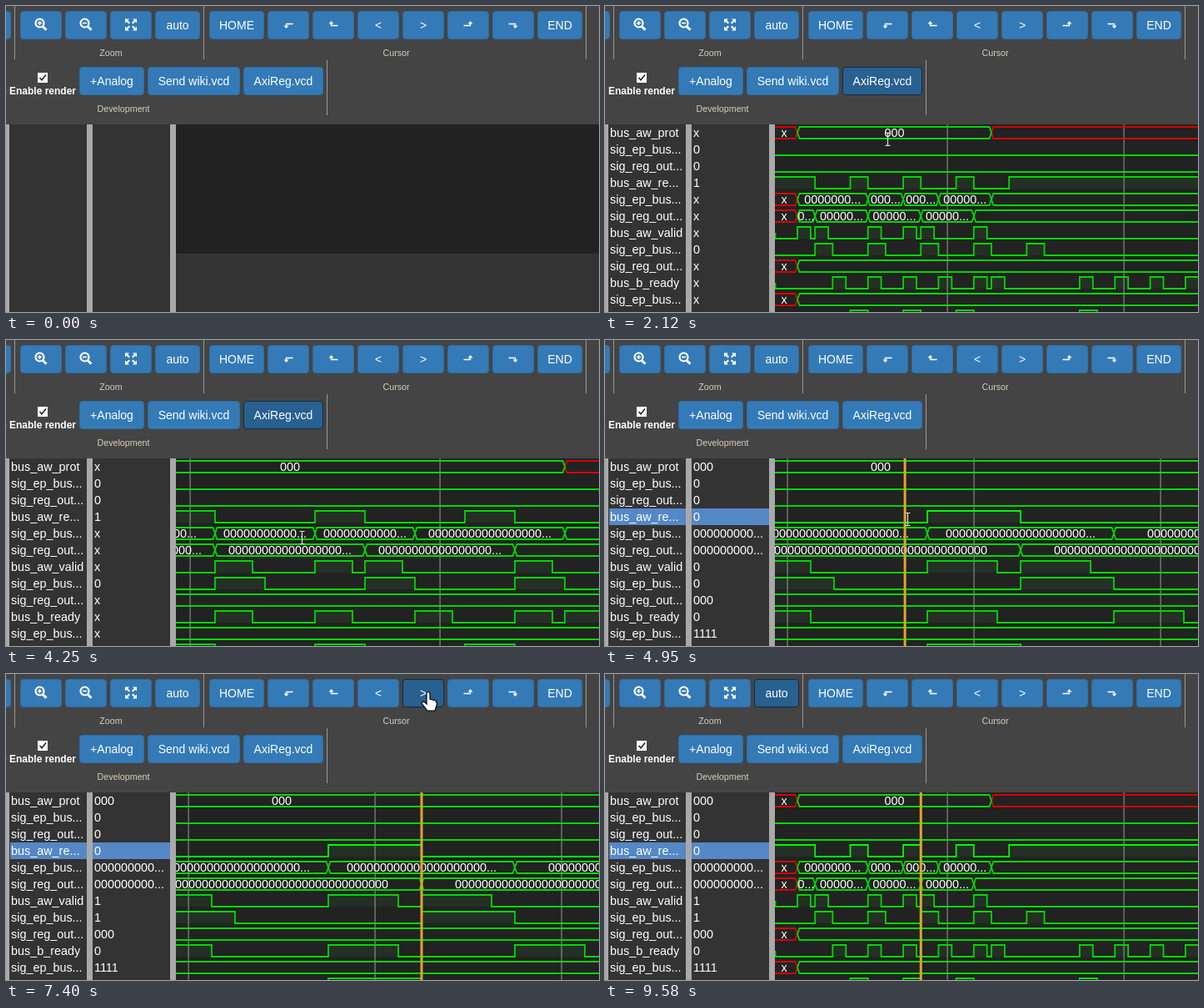
These frames come from a looping animation (712x367 px, 9.9 s). An HTML page with a canvas:

```html
<!DOCTYPE html>
<html lang="en">
<head>
<meta charset="utf-8">
<title>Waveform viewer</title>
<style>
  html, body { margin: 0; width: 100%; height: 100%; overflow: hidden; background: #444; }
  canvas { display: block; }
</style>
</head>
<body>
<canvas id="stage" width="712" height="367"></canvas>
<script>
const ctx = document.getElementById('stage').getContext('2d');
const LOOP = 9900, LOAD = 1880, PICK = 4870, PRESS_AUTO = 8210;
const FIT = 21.18, START = -1.5, END = 70;
const SANS = '"Liberation Sans", Arial, sans-serif';
const WAVE_FONT = '14.4px ' + SANS;

// Buttons: x, y, width, label or icon
const buttons = [
  [-44, 6, 50, ''], [17, 6, 50, 'zoomIn'], [71, 6, 50, 'zoomOut'], [125, 6, 50, 'fit'], [179, 6, 54, 'auto'],
  [244, 6, 66, 'HOME'], [314, 6, 50, 'leftDown'], [368, 6, 50, 'leftUp'], [422, 6, 50, '<'], [476, 6, 50, '>'],
  [530, 6, 50, 'rightUp'], [584, 6, 50, 'rightDown'], [638, 6, 54, 'END'],
  [88, 73, 78, '+Analog'], [170, 73, 111, 'Send wiki.vcd'], [285, 73, 96, 'AxiReg.vcd']
];
// from, to, label
const focusSpans = [[1330, PICK, 'AxiReg.vcd'], [6370, PRESS_AUTO, '>'], [PRESS_AUTO, LOOP, 'auto']];
const pressSpans = [[1330, 1390, 'AxiReg.vcd'], [6370, 6440, '>'], [6820, 6920, '>'], [PRESS_AUTO, 8570, 'auto']];

// Signals, in clock cycles
const word = '0'.repeat(32);
const bus = (name, edges, text, drawn = text) => ({ name, edges, text, drawn });
const pulses = (name, starts, width, early = '0') =>
  ({ name, early, toggles: starts.flatMap(s => [s, s + width]) });
const signals = [
  { ...bus('bus_aw_prot', [0, 11], '000'), tail: true },
  pulses('sig_ep_bus...', [], 1),
  pulses('sig_reg_out...', [], 1),
  { name: 'bus_aw_re...', early: '1', high: true, toggles: [1, 3, 4, 6, 7, 9, 10, 12] },
  bus('sig_ep_bus...', [0, 4, 6, 8, 11, END], word),
  bus('sig_reg_out...', [0, 1, 4, 7, 10, END], word),
  pulses('bus_aw_valid', [0, 1, 4, 6, 7, 10], .75, 'x'),
  pulses('sig_ep_bus...', [1, 4, 7, 10, 13], 1),
  bus('sig_reg_out...', [0, END], '000', ''),
  pulses('bus_b_ready', [2, 4, 6, 8, 10, 11, 16, 18, 20, 22], .75, 'x'),
  bus('sig_ep_bus...', [0, END], '1111', ''),
  pulses('', [3, 6, 9, 16], 1)
];
const SELECTED = 3;

// Stepped values: the last entry whose time has passed
const zoomSteps = [[0, FIT], [2670, 22.3], [3150, 23.55], [3230, 29], [3300, 32.1], [3700, 36], [3780, 44.5],
  [3850, 48.7], [4250, 60], [4330, 70], [4410, 84], [4490, 100], [4570, 112], [8570, FIT]];
const markSteps = [[0, START], [PICK, 5.76], [6370, 6], [6820, 7]];
const stepAt = (steps, t) => steps.filter(s => s[0] <= t).pop()[1];
const during = (spans, t, name) => spans.some(([a, b, n]) => n === name && t >= a && t < b);

// Mouse hotspot: time, x, y
const mousePath = [[600, 652, 310], [1160, 322, 82], [1800, 322, 82], [2440, 355, 237], [4720, 355, 237],
  [4950, 363, 215], [5340, 363, 215], [6130, 507, 22], [7400, 507, 22], [7950, 172, 20], [8130, 198, 18],
  [9050, 198, 18], [9580, 628, 376]];
function mouseAt(t) {
  const i = mousePath.findIndex(p => p[0] > t);
  if (i < 1) return null;
  const [a, b] = [mousePath[i - 1], mousePath[i]];
  const k = (t - a[0]) / (b[0] - a[0]), e = k * k * (3 - 2 * k);
  return { x: a[1] + (b[1] - a[1]) * e, y: a[2] + (b[2] - a[2]) * e };
}

function rect(x, y, w, h, color) {
  ctx.fillStyle = color;
  ctx.fillRect(x, y, w, h);
}
function text(s, x, y, font, align = 'left', color = '#fff') {
  ctx.font = font;
  ctx.textAlign = align;
  ctx.fillStyle = color;
  ctx.fillText(s, x, y);
}
function stroke(path, color, width) {
  ctx.strokeStyle = color;
  ctx.lineWidth = width;
  ctx.stroke(new Path2D(path));
}
function shape(path, x, y, fill, edge) {
  ctx.save();
  ctx.translate(x, y);
  ctx.fillStyle = fill;
  ctx.fill(new Path2D(path));
  if (edge) stroke(path, edge, 1.2);
  ctx.restore();
}

function zoomIcon(plus) {
  stroke('M3.5-2a5 5 0 1 1-10 0a5 5 0 1 1 10 0', '#fff', 2.2);
  stroke('M2 2L6.5 6.2', '#fff', 3);
  stroke('M-4-2H1' + (plus ? 'M-1.5-4.5V.5' : ''), '#fff', 1.6);
}
function turnIcon(sx, sy) {
  ctx.scale(sx, sy);
  stroke('M5.5-1H-2.5V2', '#fff', 1.3);
  shape('M-5.5 1H.5L-2.5 4.5Z', 0, 0, '#fff');
}
const icons = {
  zoomIn: () => zoomIcon(true),
  zoomOut: () => zoomIcon(false),
  fit() {
    for (const [sx, sy] of [[1, 1], [-1, 1], [1, -1], [-1, -1]]) {
      ctx.save();
      ctx.scale(sx, sy);
      stroke('M1.8 1.8L5 5', '#fff', 2.2);
      shape('M7 7H2L7 2Z', 0, 0, '#fff');
      ctx.restore();
    }
  },
  leftDown: () => turnIcon(1, 1),
  leftUp: () => turnIcon(1, -1),
  rightUp: () => turnIcon(-1, -1),
  rightDown: () => turnIcon(-1, 1)
};

const hovers = (m, [x, y, w]) => m && m.x >= x && m.x < x + w && m.y >= y && m.y < y + 34;

function drawButton(b, t, mouse) {
  const [x, y, w, label] = b;
  const focus = during(focusSpans, t, label), press = during(pressSpans, t, label);
  const lit = focus || hovers(mouse, b);
  ctx.beginPath();
  ctx.roundRect(x + .5, y + .5, w - 1, 33, 3.5);
  ctx.fillStyle = press ? '#204d74' : lit ? '#286090' : '#337ab7';
  ctx.fill();
  ctx.strokeStyle = focus ? '#122b40' : lit ? '#204d74' : '#2e6da4';
  ctx.lineWidth = 1;
  ctx.stroke();
  if (icons[label]) {
    ctx.save();
    ctx.translate(x + w / 2, y + 16.5);
    icons[label]();
    ctx.restore();
  } else {
    text(label, x + w / 2, y + 22, '14px ' + SANS, 'center');
  }
}

function drawToolbar(t, mouse) {
  rect(0, 0, 712, 142, '#444');
  for (const x of [10, 237, 696]) rect(x, 0, 1, 64, '#999');
  rect(385, 65, 1, 66, '#999');
  for (const [s, x, y] of [['Zoom', 126, 60], ['Cursor', 468.5, 60], ['Development', 141, 127]])
    text(s, x, y, '10.7px ' + SANS, 'center', '#d6cfc0');
  text('e Enable render', 84, 106, 'bold 12px ' + SANS, 'right');
  rect(38, 80, 12, 12, '#fff');
  stroke('M40.5 86L43 88.8L48 82.5', '#222', 1.5);
  for (const b of buttons) drawButton(b, t, mouse);
}

function valueAt(s, time) {
  if (s.edges) return time < 0 ? 'x' : s.text.length > 12 ? s.text.slice(0, 9) + '...' : s.text;
  if (time < 0) return s.early;
  return String((s.toggles.filter(e => e <= time).length + (s.high ? 1 : 0)) % 2);
}

function drawLists(t) {
  rect(0, 142, 204, 225, '#333');
  if (t >= LOAD) {
    if (t >= PICK) {
      rect(5, 202, 92, 20, '#5588c6');
      rect(104, 202, 93, 20, '#5588c6');
    }
    const time = stepAt(markSteps, t);
    signals.slice(0, -1).forEach((s, i) => {
      text(s.name, 6, 157 + 20 * i, WAVE_FONT);
      text(valueAt(s, time), 106, 157 + 20 * i, WAVE_FONT);
    });
  }
  for (const [x, w] of [[0, 4], [97, 7], [197, 7]]) rect(x, 142, w, 225, '#a9a9a9');
}

function drawSegment(a, b, label, mid, color) {
  if (b < 200 || a > 716) return;
  const l = a + 2.5, r = b - 2.5, top = mid - 7, low = mid + 7;
  stroke(`M${a} ${mid}L${l} ${top}H${r}L${b} ${mid}L${r} ${low}H${l}Z`, color, 1.8);
  const room = Math.floor((b - a) / 10);
  const fitted = label.length > room ? label.slice(0, Math.max(room - 1, 0)) + '...' : label;
  if (label) text(fitted, (a + b) / 2, mid + 4.5, WAVE_FONT, 'center');
}

function drawPulses(s, mid, X, color) {
  let up = !!s.high, from = X(START);
  let path = s.early === 'x' ? `M${X(-1.25)} ${mid}V${mid + 7}` : `M${from} ${up ? mid - 7 : mid + 7}`;
  for (const e of [...s.toggles, END]) {
    const x = X(e);
    if (up) rect(from, mid - 7, x - from, 14, 'rgba(90,255,90,.06)');
    path += `H${x}`;
    if (e !== END) {
      up = !up;
      path += `V${up ? mid - 7 : mid + 7}`;
    }
    from = x;
  }
  stroke(path, color, 1.8);
}

function drawWaves(t) {
  rect(204, 142, 508, 225, '#222');
  if (t < LOAD) {
    rect(204, 297, 508, 70, '#333');
    return;
  }
  const unit = stepAt(zoomSteps, t);
  const origin = unit === FIT ? 231 : 352.5 - 5.692 * unit;
  const X = time => origin + time * unit;
  ctx.save();
  ctx.beginPath();
  ctx.rect(204, 142, 508, 225);
  ctx.clip();
  const gap = unit < 40 ? 10 : unit < 90 ? 5 : 2;
  for (let g = START; X(g) < 712; g += gap) rect(Math.round(X(g)) - .5, 142, 1.2, 225, '#858585');
  signals.forEach((s, i) => {
    const mid = 152 + 20 * i;
    const color = t >= PICK && i === SELECTED ? '#00fa00' : '#00d800';
    if (!s.edges) return drawPulses(s, mid, X, color);
    if (s.tail) drawSegment(X(11), X(END), '', mid, '#d80000');
    drawSegment(X(START), X(0), 'x', mid, '#d80000');
    for (let k = 1; k < s.edges.length; k++)
      drawSegment(X(s.edges[k - 1]), X(s.edges[k]), s.drawn, mid, color);
  });
  if (t >= PICK) rect(X(stepAt(markSteps, t)) - 1.5, 142, 3, 225, '#dca52c');
  ctx.restore();
}

function drawMouse(m, t) {
  if (buttons.some(b => hovers(m, b)))
    shape('M-2 1Q0-2 2 1V8L9 10Q11 12 10 16L8 22H-1L-8 13Q-7 10-4 12L-2 14Z', m.x, m.y, '#fff', '#000');
  else if (m.y > 142 && t >= LOAD) {
    ctx.save();
    ctx.translate(Math.round(m.x) + .5, m.y);
    stroke('M-3-7.5H3M0-7.5V7.5M-3 7.5H3', '#ddd', 1.2);
    ctx.restore();
  } else
    shape('M0 0V16L4 12.5L7 19L9.5 18L6.5 11.5H11.5Z', m.x, m.y, '#fff', '#000');
}

function frame(now) {
  const t = now % LOOP, mouse = mouseAt(t);
  drawToolbar(t, mouse);
  drawLists(t);
  drawWaves(t);
  if (mouse) drawMouse(mouse, t);
  requestAnimationFrame(() => frame(performance.now() - begin));
}
const begin = performance.now();
frame(0);
</script>
</body>
</html>
```
